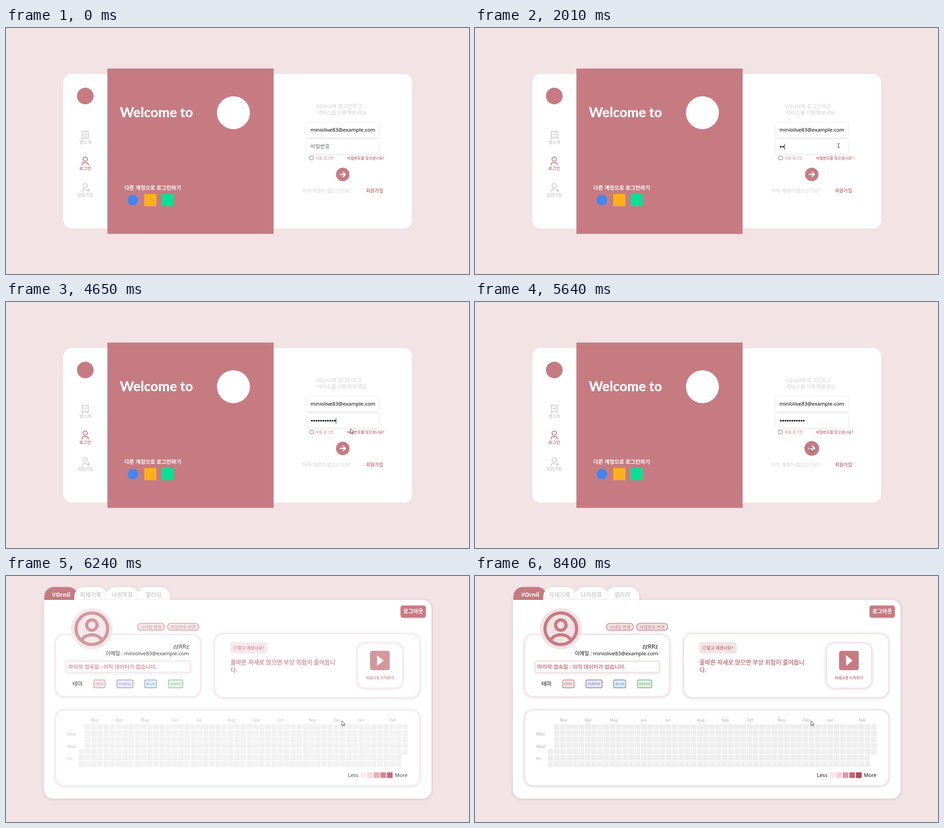
An HTML page with a canvas for the animation above (8430 ms loop, 1025x546 px).

```html
<!DOCTYPE html>
<html lang="ko">
<head>
<meta charset="utf-8">
<title>Login</title>
<style>
html, body { margin: 0; width: 100%; height: 100%; overflow: hidden; background: #f2e3e5; }
canvas { display: block; }
</style>
</head>
<body>
<canvas id="stage" width="1025" height="546"></canvas>
<script>
const ctx = document.getElementById('stage').getContext('2d');
const LOOP = 8430, PAGE_SWITCH = 5670;
const PINK = '#c67b83', PALE = '#f2e3e5', GRAY = '#cfcfcf', INK = '#111';
const SANS = '"Noto Sans", "Noto Sans CJK KR", sans-serif';
const BRAND = 'VOrnil', EMAIL = 'miniolive83@example.com', NICK = 'zzRRz';

const clamp = v => Math.max(0, Math.min(1, v));
const ramp = (t, a, b) => { const k = clamp((t - a) / (b - a)); return k * k * (3 - 2 * k); };

// y is the middle of the capitals and Hangul blocks
function text(str, x, y, size, color, weight = 400, align = 'left', family = SANS) {
  ctx.font = `${weight} ${size}px ${family}`;
  ctx.textAlign = align;
  ctx.fillStyle = color;
  ctx.fillText(str, x, y + size * 0.37);
}

function shadow(alpha, blur, dy = 1) {
  ctx.shadowColor = `rgba(70, 30, 40, ${alpha})`;
  ctx.shadowBlur = blur;
  ctx.shadowOffsetY = dy;
}
const noShadow = () => { ctx.shadowColor = 'transparent'; };

function box(x, y, r, b, radius, fill, stroke, width = 1) {
  ctx.beginPath();
  ctx.roundRect(x, y, r - x, b - y, radius);
  if (fill) { ctx.fillStyle = fill; ctx.fill(); }
  if (stroke) { ctx.strokeStyle = stroke; ctx.lineWidth = width; ctx.stroke(); }
}

function softBox(x, y, r, b, radius, fill, alpha = 0.14, blur = 6) {
  shadow(alpha, blur);
  box(x, y, r, b, radius, fill);
  noShadow();
}

function card(x, y, r, b, radius) {
  softBox(x, y, r, b, radius, PALE, 0.16, 6);
  box(x + 2.5, y + 2.5, r - 2.5, b - 2.5, radius - 2, '#fff');
}

function disc(x, y, r, fill) {
  ctx.beginPath();
  ctx.arc(x, y, r, 0, Math.PI * 2);
  ctx.fillStyle = fill;
  ctx.fill();
}

function ring(x, y, r, color, width) {
  ctx.beginPath();
  ctx.arc(x, y, r, 0, Math.PI * 2);
  ctx.strokeStyle = color;
  ctx.lineWidth = width;
  ctx.stroke();
}

function line(path, color, width, cap = 'round') {
  ctx.strokeStyle = color;
  ctx.lineWidth = width;
  ctx.lineCap = cap;
  ctx.lineJoin = cap === 'round' ? 'round' : 'miter';
  ctx.stroke(new Path2D(path));
}

// Cursor: [time, x, y]
const TRACK = [[70, 840, 300], [890, 805, 261], [4380, 805, 261], [4650, 762, 281], [5190, 743, 321], [LOOP, 743, 321]];

function cursorAt(t) {
  const i = Math.max(1, TRACK.findIndex(k => k[0] > t));
  const [t0, x0, y0] = TRACK[i - 1], [t1, x1, y1] = TRACK[i];
  const k = ramp(t, t0, t1);
  return [x0 + (x1 - x0) * k, y0 + (y1 - y0) * k];
}

function drawCursor(t) {
  if (t < 70) return;
  const [x, y] = cursorAt(t);
  const overField = t < PAGE_SWITCH && x < 825 && y > 247 && y < 279;
  ctx.save();
  ctx.translate(x, y);
  if (overField) {
    line('M-2.5-4.5H-.6M.6-4.5H2.5M0-4V4M-2.5 4.5H-.6M.6 4.5H2.5', '#222', 1, 'butt');
  } else {
    const arrow = 'M.5.5V11L3 8.7 4.7 12.2 6.3 11.5 4.7 8.1H8Z';
    ctx.fillStyle = '#fff';
    ctx.fill(new Path2D(arrow));
    line(arrow, '#333', 0.9, 'butt');
  }
  ctx.restore();
}

// Password typing
const KEYS = [1880, 2010, 2200, 2260, 2325, 2450, 2610, 2665, 2720, 2775, 2830];
const BLINKS = [1270, 1740, 1880, 3020, 3370, 3880, 4380, 4880, 5380, 5570];

function drawPassword(t) {
  const typed = KEYS.filter(k => k <= t).length;
  const pitch = 5.05;
  if (!typed) text('비밀번호', 674, 262.5, 11.7, '#666', 500);
  for (let i = 0; i < typed; i++) disc(677.2 + i * pitch, 263.5, 1.9, INK);
  const caretOn = BLINKS.filter(b => b <= t).length % 2 === 1;
  if (caretOn) {
    ctx.fillStyle = INK;
    ctx.fillRect(Math.round(674.6 + typed * pitch), 257, 1, 13);
  }
}

function drawSidebar() {
  disc(175.5, 151, 18.5, PINK);

  line('M168.8 229.2H181.8V246.2L175.3 241.6 168.8 246.2ZM172.5 236H178.2', GRAY, 2);
  text('앱소개', 175.5, 254, 9.4, GRAY, 700, 'center');

  ring(175.3, 291, 4.8, PINK, 2);
  line('M168.6 304.3V303Q168.6 299 172.8 299H178Q182 299 182 303V304.3', PINK, 2);
  text('로그인', 175.3, 312, 9.4, PINK, 700, 'center');

  ring(175.3, 350, 4.8, GRAY, 2);
  line('M168.6 363Q168.6 357.8 176 357.8M178.5 360H185.5M182 356.5V363.5', GRAY, 2);
  text('회원가입', 175.5, 371, 9.3, GRAY, 700, 'center');
}

function drawWelcome() {
  ctx.fillStyle = PINK;
  ctx.fillRect(224.5, 90, 368, 367);
  text('Welcome to', 252, 187, 30, '#fff', 800, 'left', 'Lato, sans-serif');
  disc(503.5, 188, 36.5, '#fff');
  text('다른 계정으로 로그인하기', 262, 355, 11.8, '#fff', 600);
  disc(281, 382, 11.5, '#4285f4');
  box(306, 368.5, 333, 395.5, 0, '#fbb01b');
  box(344.5, 368.5, 371.5, 395.5, 0, '#08e094');
}

function drawForm(t) {
  text(BRAND + '에 로그인하고', 687, 173.5, 11.6, GRAY, 500);
  text('서비스를 이용해보세요', 688, 188, 11.6, GRAY, 500);
  softBox(666, 211, 825.5, 242.5, 2, '#fff', 0.13, 7);
  softBox(666, 247.5, 825.5, 279, 2, '#fff', 0.13, 7);
  text(EMAIL, 674, 226, 11.4, '#000');
  drawPassword(t);

  box(672.5, 284.5, 680.5, 292.5, 1.5, '#fff', '#767676', 1);
  text('자동 로그인', 685, 288.7, 8.3, PINK, 500);
  text('비밀번호를 잊으셨나요?', 755, 288.7, 8.3, PINK, 700);

  const scale = 1 + 0.09 * ramp(t, 5000, 5200);
  ctx.save();
  ctx.translate(745.5, 325);
  ctx.scale(scale, scale);
  disc(0, 0, 15, PINK);
  line('M-5.7 0H5.7M1-5L6 0 1 5', '#fff', 2.4);
  ctx.restore();

  text('아직 계정이 없으신가요?', 656, 361.3, 10.6, GRAY, 500);
  text('회원가입', 797, 361.3, 10.4, PINK, 700);
}

function drawLogin(t) {
  box(127, 102, 899, 445, 18, '#fff');
  drawSidebar();
  drawWelcome();
  drawForm(t);
}

function drawShell() {
  const tabs = [[85, BRAND, 122], [151, '자세기록', 187.3], [221, '나의목표', 257.5], [289.5, '갤러리', 326]];
  tabs.forEach(([x, label, center], i) => {
    softBox(x, 24.5, x + 74, 56, [21, 21, 0, 0], i ? '#fff' : PINK, 0.14, 5);
    text(label, center, 41, 12.8, i ? GRAY : '#fff', i ? 700 : 600, 'center');
  });
  softBox(84, 53, 942, 494, [0, 20, 20, 20], '#fff', 0.17, 7);
}

function drawLogout() {
  softBox(873.5, 65.5, 929.5, 92.5, 5, PINK, 0.2, 4);
  text('로그아웃', 901.5, 79, 12, '#fff', 700, 'center');
}

function pill(x, r, label) {
  softBox(x, 104.5, r, 121, 8, PALE, 0.15, 4);
  box(x + 0.6, 105.2, r - 0.6, 120.4, 7.6, null, PINK, 1.3);
  text(label, (x + r) / 2, 113, 9.6, PINK, 400, 'center');
}

function drawAvatar() {
  disc(190, 117, 46, PALE);
  ring(190, 117, 35, PINK, 7);
  ring(190, 109, 11.5, PINK, 7);
  ctx.save();
  ctx.beginPath();
  ctx.arc(190, 117, 36, 0, Math.PI * 2);
  ctx.clip();
  line('M165 148C169 136 179 130.5 190 130.5S211 136 215 148', PINK, 7);
  ctx.restore();
}

function drawProfile() {
  card(108.5, 128.5, 432, 269, 20);
  drawAvatar();
  pill(290.5, 351.5, '닉네임 변경');
  pill(357, 427.5, '비밀번호 변경');
  text(NICK, 405, 156, 13, INK, 500, 'right');
  text('이메일 : ' + EMAIL, 405, 172, 11.4, INK, 400, 'right');
  card(132, 188, 409, 215, 5);
  text('마지막 접속일 : 아직 데이터가 없습니다.', 138, 201.7, 11.8, PINK, 700);
  text('테마', 147, 239, 12.2, INK, 500);
  const themes = [
    ['PINK', 193.5, 220, PALE, PINK],
    ['PURPLE', 245, 282, '#e6e4f6', '#7c78b6'],
    ['BLUE', 306.5, 334, '#dfeefa', '#5584b5'],
    ['GREEN', 359, 392, '#e2f1e4', '#72a57d']
  ];
  for (const [label, x, r, fill, color] of themes) {
    softBox(x, 230, r, 248.5, 3, fill, 0.13, 4);
    box(x + 0.6, 230.6, r - 0.6, 247.9, 3, null, color, 1.2);
    text(label, (x + r) / 2, 239.3, 7.6, color, 500, 'center');
  }
}

function drawTip() {
  card(460.5, 126.5, 917, 271, 20);
  softBox(497, 147, 578.5, 171, 5, PALE, 0.1, 5);
  ring(507.8, 159.7, 3.9, PINK, 0.9);
  line('M507.8 157.5V160M507.8 161.7V161.8', PINK, 0.9);
  text('알고 계셨나요?', 513, 159.3, 9.4, PINK, 700);
  text('올바른 자세로 앉으면 부상 위험이 줄어듭니', 497, 191.3, 13, PINK, 700);
  text('다.', 497, 208, 13, PINK, 700);
  card(776.5, 147.5, 879.5, 250, 18);
  box(806, 166, 849.5, 209, 5, PINK);
  ctx.fillStyle = '#fff';
  ctx.fill(new Path2D('M821.5 176L836 187.7 821.5 199.5Z'));
  text('자세교정 시작하기', 828, 226, 8.3, PINK, 700, 'center');
}

function drawCalendar() {
  card(108.5, 296, 917.5, 467, 20);
  const left = 160.8, top = 328.8, pitchX = 13.77, pitchY = 13.76, size = 12.5;
  ctx.fillStyle = '#eee';
  for (let col = 0; col < 53; col++) {
    for (let row = col ? 0 : 4; row < (col < 52 ? 7 : 5); row++) {
      ctx.fillRect(left + col * pitchX, top + row * pitchY, size, size);
    }
  }
  const months = 'Mar Apr May Jun Jul Aug Sep Oct Nov Dec Jan Feb'.split(' ');
  const columns = [2, 6, 10, 15, 19, 24, 28, 32, 37, 41, 45, 50];
  months.forEach((m, i) => text(m, left + columns[i] * pitchX - 0.4, 319.8, 9.3, '#aaa'));
  ['Mon', 'Wed', 'Fri'].forEach((d, i) => text(d, 135.5, 351 + i * 27.5, 9.3, '#aaa'));
  text('Less', 757, 442, 11.3, INK);
  ['#ffe7ea', '#fbcfd4', '#e497a1', '#cc6375', '#ae4957'].forEach((c, i) => {
    ctx.fillStyle = c;
    ctx.fillRect(784.8 + i * 14.65, 435.8, 12.5, 12.5);
  });
  text('More', 861, 442, 11.3, INK);
}

function drawHome(t) {
  drawShell();
  drawProfile();
  drawTip();
  drawCalendar();
  // A white veil lifts to fade the cards in as one layer
  ctx.fillStyle = `rgba(255, 255, 255, ${1 - ramp(t, 5800, 6430)})`;
  ctx.fillRect(98, 62, 832, 418);
  drawLogout();
}

function frame() {
  const t = performance.now() % LOOP;
  ctx.fillStyle = PALE;
  ctx.fillRect(0, 0, 1025, 546);
  if (t < PAGE_SWITCH) drawLogin(t);
  else drawHome(t);
  drawCursor(t);
  requestAnimationFrame(frame);
}
frame();
</script>
</body>
</html>
```
